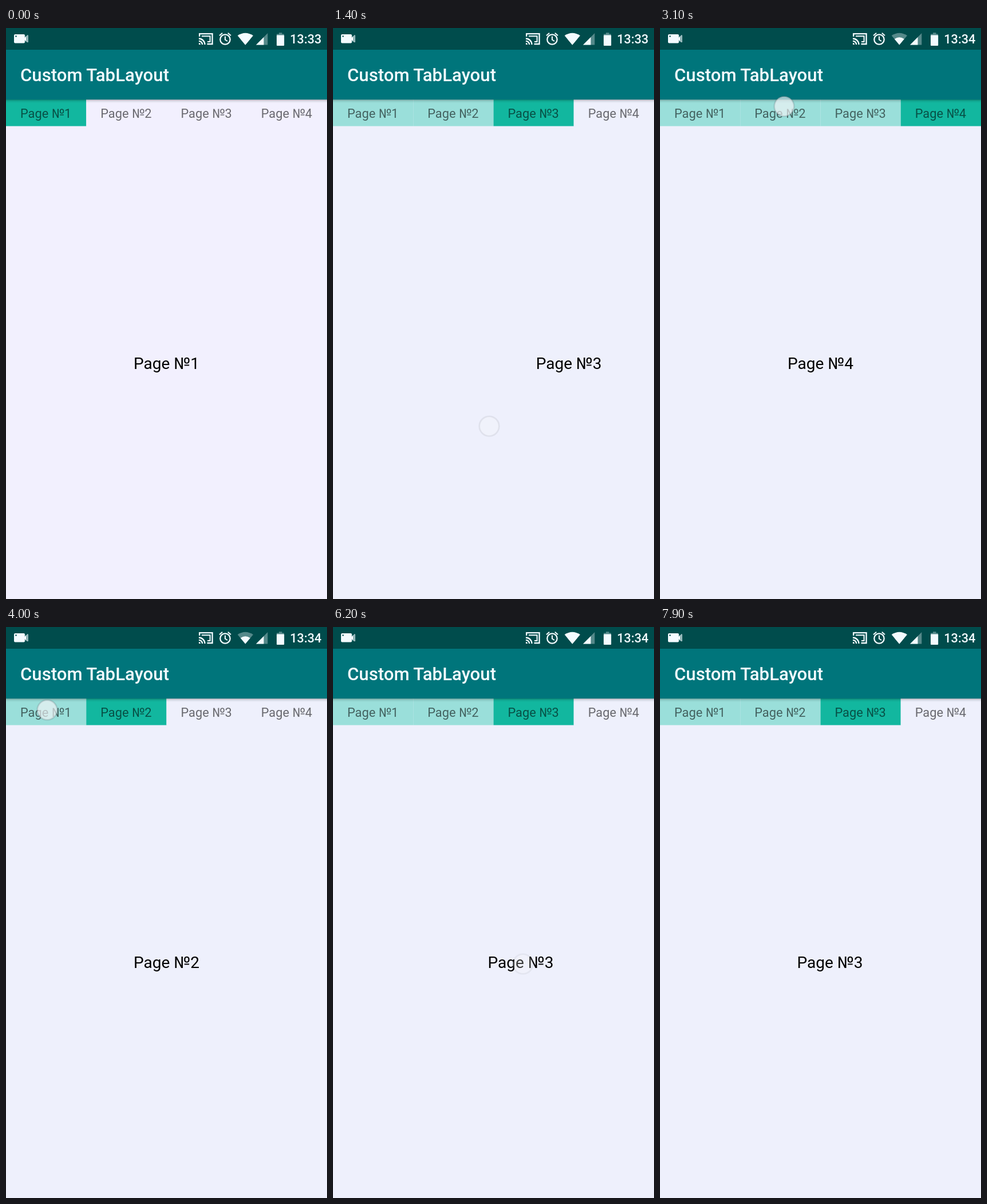
An HTML page for the animation above (8000 ms loop, 561x998 px).

```html
<!DOCTYPE html>
<html lang="en">
<head>
<meta charset="utf-8">
<title>Custom TabLayout</title>
<style>
  html, body { margin: 0; width: 100%; height: 100%; overflow: hidden; }
  svg { display: block; width: 100%; height: 100%; font-family: Roboto, sans-serif; }
</style>
</head>
<body>
<svg viewBox="0 0 561 998">
  <defs>
    <linearGradient id="shade" x2="0" y2="1">
      <stop stop-color="#000" stop-opacity=".3"/>
      <stop offset=".4" stop-color="#000" stop-opacity=".1"/>
      <stop offset="1" stop-color="#000" stop-opacity="0"/>
    </linearGradient>
  </defs>
  <rect id="background" width="561" height="998"/>
  <g id="pages" font-size="28.05" text-anchor="middle"></g>
  <g id="tabs" font-size="21.8" text-anchor="middle"></g>
  <rect y="125" width="561" height="6" fill="url(#shade)"/>
  <rect width="561" height="125" fill="#00757b"/>
  <rect width="561" height="38" fill="#004c4c"/>
  <text x="25" y="93" font-size="31.17" font-weight="500" fill="#f3fbff">Custom TabLayout</text>

  <g id="status" fill="#f3fbff">
    <!-- camera -->
    <rect x="14" y="11" width="19" height="15.5" rx="2"/>
    <path d="M33 17L36 13V25L33 21ZM37 12.5H38.5V25H37Z"/>
    <circle cx="17.5" cy="14.5" r="1.3" fill="#004c4c"/>
    <!-- cast -->
    <g fill="none" stroke="#f3fbff" stroke-width="2.3">
      <path d="M338.2 15V10.2H360.6V28H351.5M337 18.5A10.5 10.5 0 0 1 347.5 29M337 22.8A6.2 6.2 0 0 1 343.2 29"/>
      <path d="M342 14.2H356.6V24H352" stroke-width="2"/>
      <!-- alarm -->
      <circle cx="383" cy="20" r="8.7"/>
      <path d="M383 14.5V20.5L387 23M373 13.2L378.2 8.8M393 13.2L387.8 8.8" stroke-width="2"/>
    </g>
    <path d="M337 26A3 3 0 0 1 340 29H337Z"/>
    <!-- wifi -->
    <path id="wifi" d="M404.7 13.3Q418.3 4 432 13.3L418.3 29.6Z"/>
    <path d="M409.8 19.3Q418.3 13 426.8 19.3L418.3 29.6Z"/>
    <!-- signal -->
    <path d="M457.3 9V29.5H437Z" opacity=".35"/>
    <path d="M450.5 16V29.5H437Z"/>
    <!-- battery -->
    <path d="M473 10.5H477V8.2H482.5V10.5H486V14H473Z" opacity=".35"/>
    <rect x="473" y="12.5" width="13.2" height="18.5" rx="1"/>
    <text id="clock" x="551.5" y="27" font-size="21.8" font-weight="500" text-anchor="end">13:33</text>
  </g>

  <circle id="touch" r="17.3" fill="#f4f4f7" fill-opacity=".65" stroke="#60646e" stroke-opacity=".22" stroke-width="2.6"/>
</svg>
<script>
const WIDTH = 561, TAB = WIDTH / 4, LOOP = 8000, FADE = 200;
const byId = id => document.getElementById(id);

function add(parent, name, attributes, text = "") {
  const node = document.createElementNS("http://www.w3.org/2000/svg", name);
  for (const key in attributes) node.setAttribute(key, attributes[key]);
  node.textContent = text;
  return parent.appendChild(node);
}

const tabs = [], pages = [];
for (let i = 0; i < 4; i++) {
  const label = "Page №" + (i + 1), middle = TAB * (i + 0.5);
  tabs.push(add(byId("tabs"), "rect", { x: TAB * i, y: 125, width: TAB, height: 46.5 }));
  add(byId("tabs"), "text", { x: middle - 0.5, y: 157, "fill-opacity": 0.56 }, label);
  pages.push(add(byId("pages"), "text", { y: 596 }, label));
}

// Each gesture presses, drags from one point to another, lets go and settles on a page.
const gesture = (press, release, settle, page, from, to = from) =>
  ({ press, release, settle, page, from, to });
const gestures = [
  gesture(480, 650, 430, 1, [410, 606], [285, 590]),
  gesture(1150, 1300, 480, 2, [405, 680], [273, 696]),
  gesture(2170, 2350, 500, 3, [400, 670], [270, 682]),
  gesture(3040, 3140, 600, 1, [217, 137]),
  gesture(3980, 4080, 600, 0, [72, 145]),
  gesture(5180, 5280, 600, 1, [212, 145]),
  gesture(5930, 6075, 350, 2, [450, 605], [332, 589]),
  gesture(6370, 6500, 400, 1, [280, 625], [405, 642]),
  gesture(6790, 6920, 570, 0, [280, 630], [410, 644]),
  gesture(7210, 7330, 380, 1, [415, 670], [295, 650]),
  gesture(7550, 7670, 480, 2, [415, 621], [295, 605]),
];

const clamp = v => Math.min(1, Math.max(0, v));
const mix = (a, b, k) => a + (b - a) * k;

function stateAt(t) {
  const index = gestures.findLastIndex(g => g.press <= t);
  if (index < 0) return { position: 0, selected: 0, x: 0, y: 0, alpha: 0 };
  const g = gestures[index];
  const start = index ? gestures[index - 1].page : 0;
  const drag = clamp((t - g.press) / (g.release - g.press));
  const x = mix(g.from[0], g.to[0], drag), y = mix(g.from[1], g.to[1], drag);
  const eased = 1 - (1 - clamp((t - g.release) / g.settle)) ** 5;
  return {
    position: mix(start + (g.from[0] - x) / WIDTH, g.page, eased),
    selected: t >= g.release ? g.page : start,
    x, y,
    alpha: 1 - clamp((t - g.release) / FADE),
  };
}

function draw(now) {
  const t = now % LOOP;
  const { position, selected, x, y, alpha } = stateAt(t);
  const background = t < 500 ? "#f2f0fe" : "#eef0fc";
  byId("background").setAttribute("fill", background);
  tabs.forEach((tab, i) => tab.setAttribute("fill",
    i === selected ? "#12b79f" : i < selected ? "#9adfda" : background));
  pages.forEach((page, i) => page.setAttribute("x", WIDTH / 2 + (i - position) * WIDTH));
  byId("touch").setAttribute("transform", `translate(${x} ${y})`);
  byId("touch").setAttribute("opacity", alpha);
  byId("clock").textContent = t < 2200 ? "13:33" : "13:34";
  byId("wifi").setAttribute("opacity", t >= 2200 && t < 5800 ? 0.35 : 1);
}

function frame() {
  draw(performance.now());
  requestAnimationFrame(frame);
}
frame();
</script>
</body>
</html>
```
